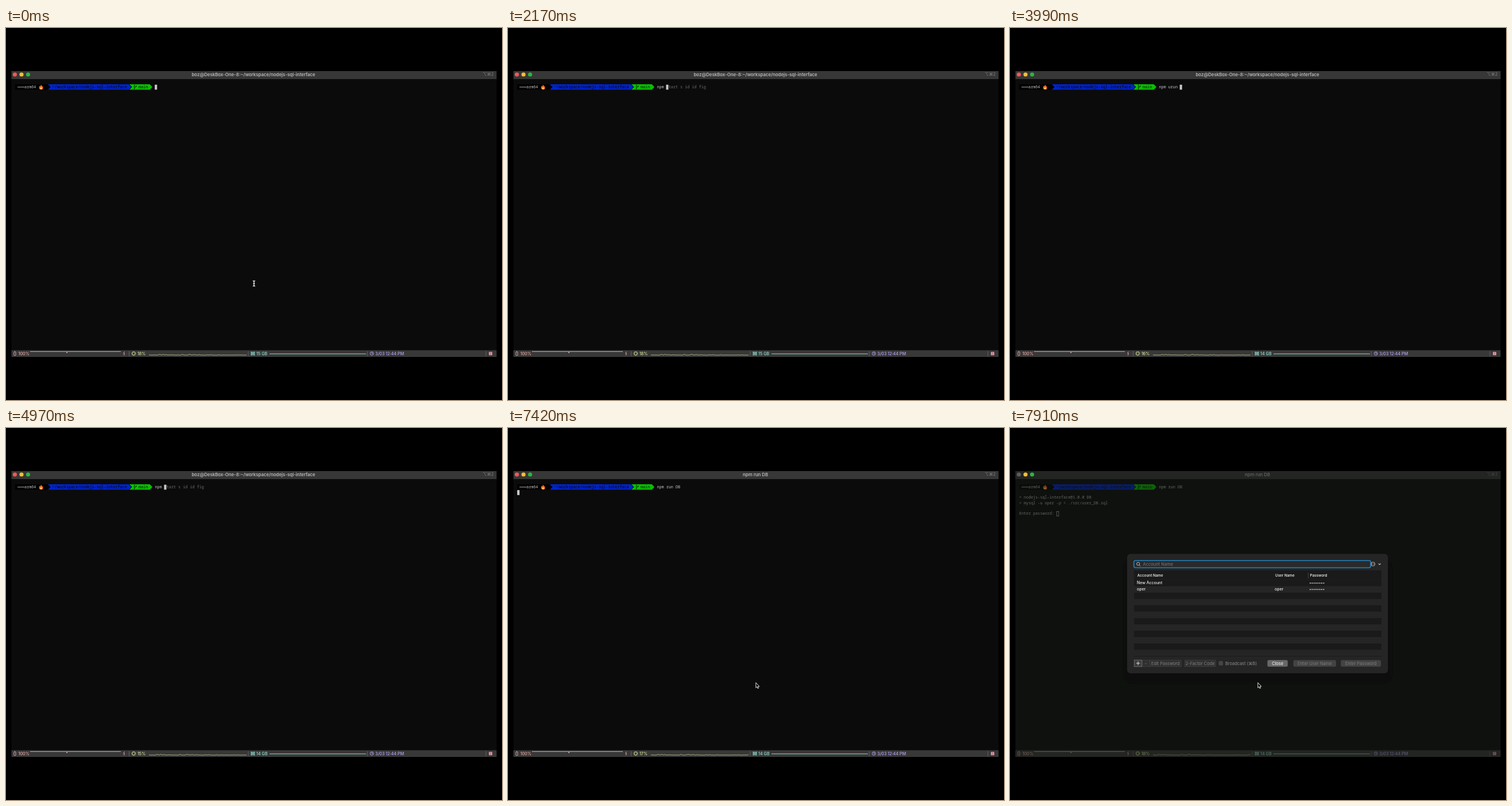
These frames come from a looping animation (864 by 648 pixels, 8000 ms). An HTML page:

```html
<!DOCTYPE html>
<html lang="en">
<head>
<meta charset="utf-8">
<title>Terminal session</title>
<style>
  html, body { margin: 0; width: 100%; height: 100%; overflow: hidden; background: #000; }
  svg { display: block; width: 864px; height: 648px; }
  text { font-family: Inter, "DejaVu Sans", sans-serif; white-space: pre; }
  .mono { font: 6.77px "Noto Sans Mono", "DejaVu Sans Mono", monospace; fill: #c4c4c4; }
  .bar { font-size: 7.15px; font-weight: 500; }
  .ui { font-size: 7.4px; }
  .line { fill: none; stroke-width: .9; }
</style>
</head>
<body>
<svg viewBox="0 0 864 648">
  <defs><filter id="soft"><feGaussianBlur stdDeviation="1"/></filter></defs>
  <rect width="864" height="648"/>
  <rect x="9.5" y="75" width="845" height="498" fill="#0b0b0b"/>
  <rect x="9.5" y="75" width="845" height="14" fill="#373737"/>
  <text id="title" x="431.1" y="83.5" text-anchor="middle" font-size="7.8" font-weight="600" fill="#bababa"></text>
  <text x="849.3" y="83.1" text-anchor="end" font-size="7.2" fill="#858585">⌥⌘2</text>

  <path d="M16 98H74L78.5 102.7L74 107.5H16Z" fill="#000"/>
  <text class="mono" x="19.9" y="105">═══arm64</text>
  <path d="M60.8 98.2C61.2 100.2 64.8 101.2 64.7 104.4C64.6 106.6 63 107.2 61.2 107.2C59 107.2 57.4 106 57.5 104C57.5 102.5 58.5 101.7 58.7 100.6L59.8 101.6C60.6 100.7 60.9 99.5 60.8 98.2Z" fill="#f4622a"/>
  <path d="M61.3 102.5C61.4 103.7 63.2 104 63 105.6C62.8 107.3 59.4 107.3 59.2 105.5C59.1 104.4 60.8 104 61.3 102.5Z" fill="#ffd05a"/>
  <path d="M73 98H213.8L218.3 102.7L213.8 107.5H73L77.5 102.7Z" fill="#0023c8"/>
  <text class="mono" x="80.8" y="105" style="fill:#000">~/workspace/nodejs-sql-interface</text>
  <path d="M215 98H250.5L255 102.7L250.5 107.5H215L219.5 102.7Z" fill="#08c000"/>
  <path class="line" d="M223.7 98.6V107M223.7 105C224.4 102.8 226.8 103.6 227 101M225.3 101.2H228" stroke="#032a03"/>
  <text class="mono" x="231" y="105" style="fill:#001800">main</text>
  <text id="typed" class="mono" x="259.5" y="105"></text>
  <text id="hint" class="mono" y="105" style="fill:#6c6c6c"></text>
  <g id="output">
    <text class="mono" x="15.9" y="123.4">&gt; nodejs-sql-interface@1.0.0 DB</text>
    <text class="mono" x="15.9" y="132.7">&gt; mysql -u oper -p &lt; ./src/user_DB.sql</text>
    <text class="mono" x="15.9" y="151.3">Enter password:</text>
    <rect x="81.3" y="145.4" width="3.6" height="8" fill="none" stroke="#c4c4c4" stroke-width=".8"/>
  </g>
  <rect id="block" width="4.1" height="8.6" fill="#c7c7c7"/>

  <g id="status">
    <rect x="9.5" y="561.3" width="845" height="11.7" fill="#393838"/>
    <path d="M214.5 563V571.5M422 563V571.5M629.3 563V571.5M836 563V571.5" class="line" stroke="#686868"/>
    <g stroke="#e3a9a5" class="line">
      <rect x="13.8" y="564.2" width="3.2" height="6.2" rx=".8"/>
      <path d="M14.8 563.3H16"/>
      <path d="M42 563.6H105.6V565.8H106.6V563.6H200" stroke="#d8bab7"/>
      <path d="M206.3 563.7L204.8 567H206.6L205.2 570.4"/>
    </g>
    <text class="bar" x="21.5" y="569.7" fill="#e3a9a5">100%</text>
    <circle cx="222.5" cy="567" r="2.6" class="line" stroke="#d5e5a0"/>
    <circle cx="222.5" cy="567" r="3.6" class="line" stroke="#d5e5a0" stroke-dasharray="1.2 1.6"/>
    <text id="cpu" class="bar" x="228.9" y="569.7" fill="#d5e5a0"></text>
    <path id="spark" class="line" stroke="#aeb685"/>
    <g class="line" stroke="#96e3d2">
      <path d="M427.8 564.2V570M432.2 564.2V570M430 564V570M426 564.6H429.4M430.6 564.6H434M426 567H434M426 569.6H429.4M430.6 569.6H434"/>
      <path d="M459 567.7H627"/>
    </g>
    <text id="memory" class="bar" x="436" y="569.7" fill="#96e3d2"></text>
    <g class="line" stroke="#b5a5f2"><circle cx="637.3" cy="567" r="3"/><path d="M637.3 565V567.2H639"/></g>
    <text class="bar" x="643.2" y="569.7" fill="#b5a5f2">3/03 12:44 PM</text>
    <rect x="841.2" y="564.3" width="5.8" height="5.8" rx="1" fill="#e5a0ac"/>
    <path d="M842.7 566H845.5M842.7 568.3H845.5" class="line" stroke="#8b4a58"/>
  </g>

  <rect id="dim" x="9.5" y="75" width="845" height="498" fill="#111711"/>
  <circle id="closeDot" cx="15.4" cy="81" r="3.6"/>
  <circle cx="27" cy="81" r="3.6" fill="#fdbc2e"/>
  <circle cx="38.5" cy="81" r="3.6" fill="#27b93c"/>

  <rect id="shadow" x="198" y="230" width="467" height="214" rx="14" fill="#080a08" filter="url(#soft)"/>
  <g id="dialog">
    <rect x="204" y="219.3" width="454.3" height="208" rx="6" fill="#252525"/>
    <rect x="216" y="231.4" width="411.5" height="11.4" rx="3" fill="#292a2b"/>
    <path id="underline" d="M218 242.8H626" class="line" stroke="#6b6b6b"/>
    <rect id="ring" x="215.7" y="230.9" width="412.6" height="12.4" rx="3" fill="none" stroke="#2677a8" stroke-width="1.8"/>
    <g class="line" stroke="#cfcfcf">
      <circle cx="223.2" cy="236.6" r="2.6"/><path d="M225.1 238.6L227.2 240.8"/>
      <circle cx="632.3" cy="237" r="3.4"/><path d="M630.2 237H634.4" stroke-dasharray="1 .6"/>
      <path d="M641.8 236.2L643.8 238.1L645.8 236.2" stroke-width="1.1"/>
    </g>
    <text x="231.6" y="239.8" font-size="7.5" fill="#797979">Account Name</text>
    <rect id="caret" x="232" y="232.3" width="1" height="10" fill="#e8e8e8"/>
    <g id="table"></g>
    <g id="buttons"></g>
  </g>

  <path id="beam" d="M429.9 440.4Q432 440.4 432 442V448Q432 449.7 429.9 449.7M434.1 440.4Q432 440.4 432 442M432 448Q432 449.7 434.1 449.7M430.6 445H433.4" fill="none" stroke="#eee" stroke-width="1.3"/>
  <path id="arrow" d="M431.8 443.6V452.6L433.8 450.7L435.1 453.7L436.5 453.1L435.2 450.2H437.8Z" fill="#000" stroke="#fff" stroke-width=".9"/>
</svg>
<script>
const LOOP = 8000, CELL = 4.06, PROMPT_X = 259.5;
const ENTER = 7280, SHEET = 7490;
const $ = id => document.getElementById(id);
const show = (id, on) => $(id).setAttribute('visibility', on ? 'visible' : 'hidden');
const set = (id, attrs) => Object.entries(attrs).forEach(([k, v]) => $(id).setAttribute(k, v));
const latest = (list, t) => list.filter(([at]) => at <= t).pop()[1];

const rect = (x, y, w, h, fill, extra = '') =>
  `<rect x="${x}" y="${y}" width="${w}" height="${h}" fill="${fill}" ${extra}/>`;
const label = (x, y, words, fill, extra = '') =>
  `<text class="ui" x="${x}" y="${y}" fill="${fill}" ${extra}>${words}</text>`;

// Each key is [time, character]; '<' deletes one character.
const keys = [
  [1050, 'n'], [1260, 'p'], [1470, 'm'], [1750, ' '],
  [2660, 'u'], [2940, 'r'], [3150, 'u'], [3360, 'n'], [3640, ' '],
  [4340, '<'], [4480, '<'], [4620, '<'], [4760, '<'], [4900, '<'],
  [5250, 'r'], [5460, 'u'], [5600, 'n'], [5810, ' '],
  [6370, 'D'], [6650, 'B']
];
const history = ['npm start s id id fig', 'npm run DB'];
const cpu = [[0, 18], [2800, 16], [4690, 15], [6510, 17], [7700, 18]];
const memory = [[0, 15], [2800, 14]];

function buildTable() {
  let out = rect(216, 248, 431, 150, '#252525') + rect(216, 248, 431, 16.5, '#1a1a1a');
  for (let i = 0; i < 6; i++) out += rect(216, 264.6 + i * 22.15, 431, 11, '#1a1a1a');
  out += rect(216, 397, 431, 1, '#1a1a1a') + rect(519, 252, .8, 10, '#4b4b4b');
  const head = 'style="font-size:6.3px;font-weight:600"';
  [[221.8, 'Account Name'], [462, 'User Name'], [522.5, 'Password']]
    .forEach(([x, words]) => out += label(x, 258.9, words, '#e4e4e4', head));
  const cell = 'style="font-size:6.9px;font-weight:500"';
  [[221, 272.4, 'New Account'], [221, 283.4, 'oper'], [461, 283.4, 'oper']]
    .forEach(([x, y, words]) => out += label(x, y, words, '#f0f0f0', cell));
  for (const y of [270.2, 281.3])
    for (let i = 0; i < 8; i++) out += `<circle cx="${523 + i * 3.35}" cy="${y}" r=".95" fill="#e6e6e6"/>`;
  $('table').innerHTML = out;
}

function buildButtons() {
  const button = (x, w, words, fill, ink, extra = '') =>
    rect(x, 404.2, w, 11.5, fill, extra) + label(x + w / 2, 412.5, words, ink, 'text-anchor="middle"');
  const edge = 'stroke="#484848" stroke-width=".6"';
  $('buttons').innerHTML =
    button(230, 13.5, '−', '#303030', '#777', edge) +
    button(243.5, 54.5, 'Edit Password', '#303030', '#818181', edge) +
    button(304.3, 53.7, '2-Factor Code', '#303030', '#818181', edge) +
    button(216.3, 13.5, '', '#3c3c3c', '#fff', 'stroke="#777" stroke-width=".8"') +
    '<path d="M219.9 409.8H226.3M223.1 406.6V413" class="line" stroke="#eee"/>' +
    rect(363.6, 406, 7.4, 7.4, '#454545', 'rx="1.5"') +
    label(375, 412.5, 'Broadcast (⌘B)', '#8d8d8d') +
    button(448.4, 35.4, 'Close', '#686868', '#fff', 'rx="2.5"') +
    button(493.5, 74.5, 'Enter User Name', '#434343', '#7d7d7d', 'rx="2.5"') +
    button(576.2, 70, 'Enter Password', '#434343', '#7d7d7d', 'rx="2.5"');
}

function sparkPath(shift) {
  const noise = n => { const v = Math.sin(n * 12.9898) * 43758.5453; return v - Math.floor(v); };
  let d = 'M249 569.4';
  for (let i = 1; i <= 85; i++) d += `L${249 + i * 2} ${(569.8 - noise(i + shift) ** 3 * 1.4).toFixed(1)}`;
  return d;
}

function typedAt(t) {
  return keys.filter(([at]) => at <= t)
    .reduce((s, [, key]) => key === '<' ? s.slice(0, -1) : s + key, '');
}

function render(t) {
  const entered = t >= ENTER, sheet = t >= SHEET;
  const typed = typedAt(t);
  const match = typed && !entered ? history.find(line => line.startsWith(typed)) || '' : '';
  const cursorX = PROMPT_X + typed.length * CELL;

  $('title').textContent = entered ? 'npm run DB' : 'boz@DeskBox-One-8:~/workspace/nodejs-sql-interface';
  $('typed').textContent = typed;
  $('hint').textContent = match.slice(typed.length + 1);
  set('hint', { x: cursorX + CELL });
  set('block', entered ? { x: 16, y: 108.2 } : { x: cursorX - .4, y: 98.8 });
  show('block', !sheet);
  show('output', sheet);
  show('beam', t < keys[0][0]);
  show('arrow', t >= ENTER + 70);

  $('cpu').textContent = latest(cpu, t) + '%';
  $('memory').textContent = latest(memory, t) + ' GB';
  set('spark', { d: sparkPath(cpu.filter(([at]) => at <= t).length) });

  const p = Math.min(1, Math.max(0, (t - SHEET) / 180));
  const left = (1 - p) ** 2;
  show('dialog', sheet);
  set('dialog', { transform: `translate(0 ${-14 * left})`, opacity: Math.min(1, .5 + p * 1.4) });
  set('dim', { opacity: sheet ? .55 - .43 * left : 0 });
  set('shadow', { opacity: Math.max(0, p * 1.6 - .6) });
  set('closeDot', { fill: sheet ? '#5c5c5c' : '#fc5750' });

  const focused = t >= 7630;
  // Nested parts use display so that the hidden dialog keeps them hidden.
  set('ring', { display: focused ? 'inline' : 'none' });
  set('underline', { display: focused ? 'none' : 'inline' });
  set('caret', { display: t < 7910 ? 'inline' : 'none' });
}

buildTable();
buildButtons();
function tick() {
  render(performance.now() % LOOP);
  requestAnimationFrame(tick);
}
tick();
</script>
</body>
</html>
```
